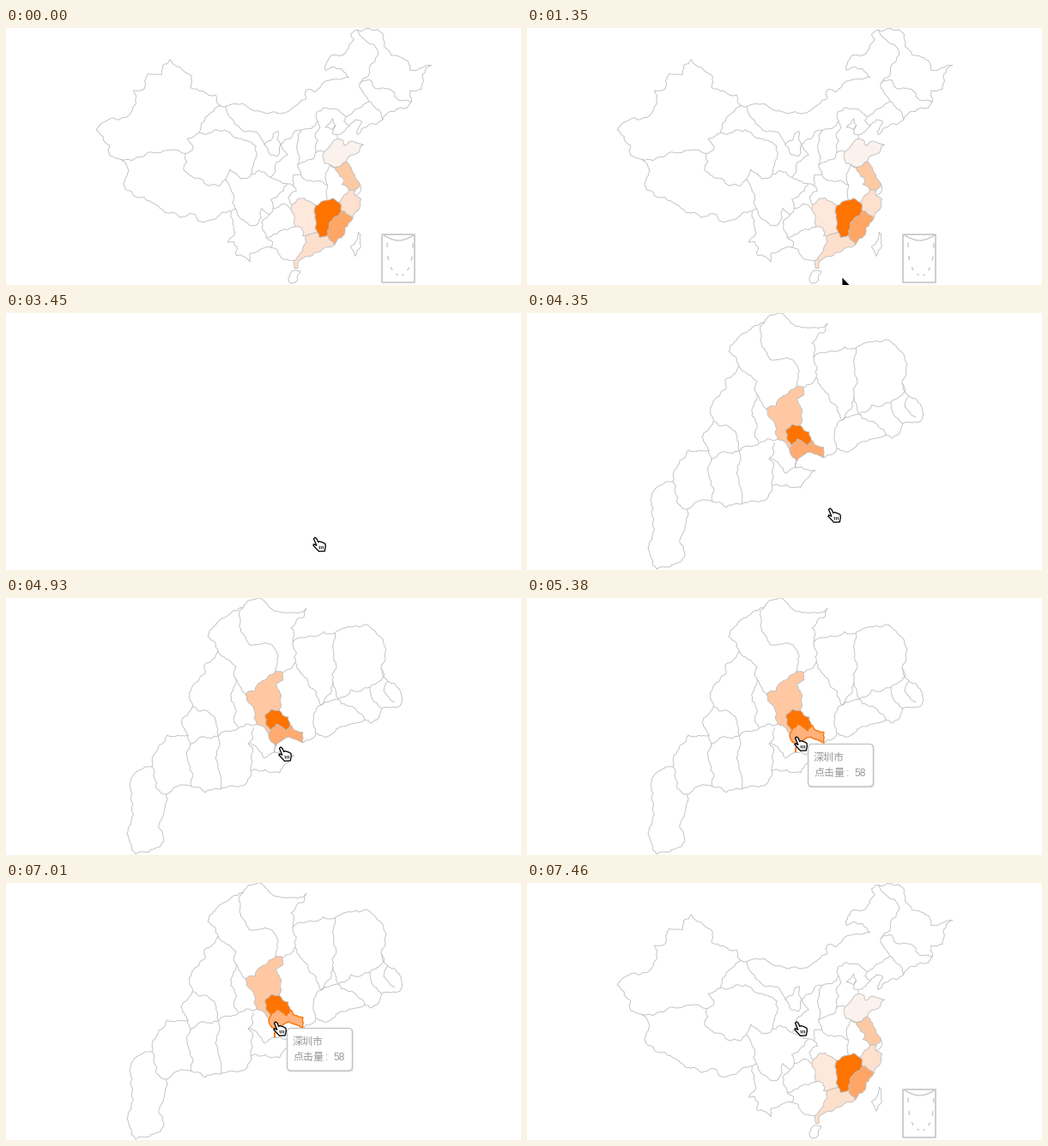
Animation of 600x300 px, one loop 8000 ms. Source, as a matplotlib script:

```python
import math
import random
import matplotlib.pyplot as plt
from matplotlib.animation import FuncAnimation
from matplotlib.collections import LineCollection
from matplotlib.patches import FancyBboxPatch, Polygon

W, H, PX = 600, 300, 0.72
LOOP, STEP = 8000, 25
GREY, ORANGE = "#c0c0c0", "#ff7300"

fig = plt.figure(figsize=(W / 100, H / 100), dpi=100, facecolor="white")
ax = fig.add_axes([0, 0, 1, 1])
ax.set_xlim(0, W)
ax.set_ylim(H, 0)
ax.axis("off")


def split(a, b, rng):
    dx, dy = b[0] - a[0], b[1] - a[1]
    if dx * dx + dy * dy < 16:
        return [a]
    k = rng.uniform(-0.18, 0.18)
    mid = ((a[0] + b[0]) / 2 - dy * k, (a[1] + b[1]) / 2 + dx * k)
    return split(a, mid, rng) + split(mid, b, rng)


def rough(points):
    """Wiggly border; a shared edge gets the same wiggle in both directions."""
    out = []
    for a, b in zip(points, points[1:]):
        lo, hi = sorted((a, b))
        edge = split(lo, hi, random.Random(f"{lo}{hi}")) + [hi]
        out += edge if a == lo else edge[::-1]
    return out


def project(points):
    return [(round(105 + (lon - 73.5) * 6.36, 1), round((53.55 - lat) * 8.44, 1))
            for lon, lat in points]


def chain(*parts):
    """Join border pieces into one ring."""
    ring = [p for part in parts for p in part]
    ring = [p for i, p in enumerate(ring) if i == 0 or p != ring[i - 1]]
    return ring if ring[0] == ring[-1] else ring + [ring[0]]


def add_lines(paths, width=0.9):
    return ax.add_collection(LineCollection(paths, colors=GREY, linewidths=width * PX, zorder=1))


def add_area(ring, fill, edge=GREY, width=0.9, z=2):
    return ax.add_patch(Polygon(rough(ring), facecolor=fill, edgecolor=edge,
                                linewidth=width * PX, joinstyle="round", zorder=z))


# ---- country: longitude, latitude ----
north = [(73.5, 39.4), (74.8, 40.5), (78.1, 41.1), (80.1, 42.1), (80.8, 43.2), (80.3, 44.9),
         (82.4, 45.2), (83, 47.2), (85.5, 47.1), (85.7, 48.4), (87.1, 49.2), (88.1, 48.3),
         (91, 46.8), (90.8, 45.3), (95.4, 44.3), (96.3, 42.8), (97.2, 42.7), (101.8, 42.3),
         (104.5, 41.7), (109.3, 42.4), (111.9, 43.7), (112, 45), (113.6, 44.7), (116.2, 46.3),
         (119.8, 46.7), (118.5, 47.9), (115.5, 47.7), (116.7, 49.8), (119.2, 50.1),
         (120.7, 52), (120.1, 52.7), (121.3, 53.3)]
east = [(121.3, 53.3), (123.6, 53.5), (126.1, 52.6), (127.5, 49.8), (130.7, 48.9),
        (131, 47.7), (134.9, 48.4), (133.1, 45.1), (131, 44.9), (131.3, 43.4), (130.5, 42.5),
        (128.1, 42), (126.9, 41.8), (126, 40.9), (121.3, 38.8), (122.2, 40.5), (121, 40.9),
        (119.9, 40), (117.7, 38.8), (117.7, 38.2)]
southwest = [(109.8, 21.4), (108, 21.5), (106.7, 22.9), (105.5, 23.2), (101.7, 22.4),
             (101.7, 21.2), (99.2, 22.1), (98.7, 24), (97.6, 23.9), (98.7, 25.9),
             (98.2, 28.2), (95.8, 27.5), (94, 26.9), (92.1, 26.9), (91.6, 27.8), (89, 27.3),
             (86.2, 28), (82.2, 30.2), (78.8, 31.3), (78, 35.4), (76, 35.9), (74.8, 38.5),
             (73.5, 39.4)]
west_inner = [
    [(78, 35.4), (82, 35.7), (89.8, 36.2), (91.3, 37), (90.2, 38.2), (92.4, 39.1),
     (92.8, 40.4), (96.3, 42.8)],
    [(89.8, 36.2), (89.5, 34), (92, 32.8), (96, 31.7), (97.2, 32.6), (98.7, 30.5),
     (99.1, 28.5), (98.2, 28.2)],
    [(97.2, 32.6), (98, 34), (100, 32.7), (101.9, 33.3)],
    [(92.4, 39.1), (98.3, 38.8), (102.8, 37.2), (102.4, 35), (101.9, 33.3)],
    [(97.2, 42.7), (97.8, 41.4), (100.2, 39.4), (103, 39.1), (104.3, 37.4)],
]
loess_inner = [
    [(104.3, 37.4), (106, 39), (106.8, 39.3), (107.3, 37.5), (106.7, 35.8), (105.4, 36),
     (104.3, 37.4)],
    [(107.3, 37.5), (108.6, 36), (106.6, 35), (105.5, 32.9), (103.2, 33.8), (101.9, 33.3)],
    [(107.3, 37.5), (109.9, 39.3), (111.1, 39.4), (110.4, 36.5), (110.4, 34.6), (111, 33.3),
     (109.6, 33.2), (109.6, 31.7), (108.5, 32), (105.5, 32.9)],
]
south_inner = [
    [(108.5, 32), (106.7, 30.2), (105.5, 29.8), (105.9, 28.6), (107.5, 29.2), (109.2, 28.5)],
    [(109.6, 31.7), (110.2, 31), (108.7, 30.2), (109.3, 29.1)],
    [(99.1, 28.5), (101.7, 26.2), (102.7, 26.2), (103.9, 28.6), (105.3, 27.8), (105.9, 28.6)],
    [(105.3, 27.8), (103.8, 26.7), (104.6, 24.6), (107.2, 25.5), (109.8, 26)],
    [(104.6, 24.6), (105.8, 24), (105.5, 23.2)],
]
plain_inner = [
    [(111, 33.3), (112.3, 32.4), (113.8, 32.4), (115.9, 31.8)],
    [(110.4, 34.6), (113, 35.4), (113.7, 36.3), (115.3, 36.4)],
    [(116.4, 34.6), (115.5, 33.1), (115.9, 31.8), (115.9, 29.8)],
    [(113.7, 36.3), (114.1, 38), (113.6, 38.8), (114.5, 39.8), (114.1, 40.7), (111.1, 39.4)],
    [(114.1, 40.7), (113.9, 41.9), (116.9, 42.4), (119.3, 41.3), (118.9, 40.7), (119.9, 40)],
    [(117.3, 40.1), (116.8, 41), (115.5, 39.8), (116.8, 39.5), (117.3, 40.1), (116.8, 38.9),
     (117.7, 38.8)],
]
northeast_inner = [
    [(119.3, 41.3), (121.4, 42.4), (123.5, 43.4), (125.5, 42), (126, 40.9)],
    [(123.5, 43.4), (121.8, 45.9), (123.9, 46.3), (124.2, 45.5), (126.5, 45.2), (128.8, 43.6),
     (131.3, 43.4)],
    [(121.8, 45.9), (123, 46.7), (123.6, 48.1), (125.2, 49.9), (124.3, 51.3), (121.3, 53.3)],
]
islands = [
    [(108.7, 19), (109.5, 20), (110.9, 19.9), (110.4, 18.7), (109.2, 18.2), (108.7, 19)],
    [(121.5, 25.3), (121.9, 25), (120.9, 22), (120.1, 23.3), (121.5, 25.3)],
    [(121.9, 31.8), (121.9, 30.9), (120.9, 30.4)],
]

# Borders shared by the coloured provinces
hn_jx = [(113.7, 29), (113.6, 27.3), (114, 25.3)]
hn_gd = [(114, 25.3), (112, 24.8)]
jx_gd = [(114, 25.3), (114.4, 24.6), (115.9, 24.9)]
jx_fj = [(115.9, 24.9), (116.2, 26), (118.4, 28.2)]
jx_zj = [(118.4, 28.2), (118, 29.4)]
fj_gd = [(115.9, 24.9), (117.2, 23.6)]
fj_zj = [(118.4, 28.2), (119, 28.2), (120.5, 27.2)]
js_zj = [(119.8, 31.1), (120.9, 31)]
js_sd = [(116.4, 34.6), (118.4, 34.5), (119.3, 35.1)]

shandong = chain([(117.7, 38.2), (118.8, 37.9), (119, 37.3), (120.8, 37.8), (122.5, 37.4),
                  (120.2, 36)], js_sd[::-1], [(115.4, 34.8), (115.3, 36.4)])
jiangsu = chain(js_sd, [(120.3, 34.2), (120.9, 32.9), (121.9, 31.8)], js_zj[::-1],
                [(118.5, 31.9), (118.9, 32.6), (117.6, 33.7)])
zhejiang = chain(js_zj, [(120.9, 30.4), (122, 29.9), (121.6, 28.4)], fj_zj[::-1], jx_zj,
                 [(119.4, 30.6)])
fujian = chain(fj_zj, [(119.8, 26.6), (118.9, 24.9)], fj_gd[::-1], jx_fj)
jiangxi = chain(hn_jx, jx_gd, jx_fj, jx_zj, [(116.8, 30), (115, 29.6)])
hunan = chain(hn_jx, hn_gd, [(111.3, 24.8), (111.2, 25.9), (109.8, 26), (109.2, 28.5),
                             (109.3, 29.1), (110.6, 30), (112.5, 29.6)])
guangdong = chain(hn_gd[::-1], jx_gd, fj_gd,
                  [(114.7, 22.7), (113.4, 22.4), (110.5, 21.3), (110.4, 20.3), (109.9, 20.3),
                   (109.8, 21.4), (110.9, 22.4), (111.9, 23.8)])

country_paths = [north, east, southwest, *west_inner, *loess_inner, *south_inner,
                 *plain_inner, *northeast_inner, *islands]
country = [add_lines([rough(project(p)) for p in country_paths])]
for ring, fill in [(shandong, "#fcf2ed"), (jiangsu, "#fcc9a3"), (zhejiang, "#fde0cd"),
                   (hunan, "#fde8db"), (guangdong, "#fde0cc"), (fujian, "#ffa565"),
                   (jiangxi, ORANGE)]:
    country.append(add_area(project(ring), fill))

# Inset of the southern islands: a shore line and a U of dashes
country.append(add_lines([[(438, 241), (476, 241), (476, 297), (438, 297), (438, 241)]], 1.5))
shore = [(440 + x, 242 + 6 * math.sin(math.pi * x / 35)) for x in range(36)]


def bay(angle):
    return 459 + 15 * math.cos(angle), 256 + 33 * math.sin(angle)


dashes = [[bay(k * 0.47 - 0.15), bay(k * 0.47 + 0.02)] for k in range(8)]
country.append(add_lines([shore, *dashes], 1.2))

# ---- province: pixels ----
outline_east = [(277, 10), (293, 0), (305, 8), (350, 12), (347, 22), (332, 35), (334, 52),
                (358, 45), (383, 41), (405, 33), (428, 37), (437, 46), (442, 70), (437, 82),
                (445, 97), (459, 108), (459, 126), (438, 129), (425, 146), (418, 142),
                (393, 150), (361, 158), (346, 169)]
outline_west = [(313, 180), (336, 184), (319, 204), (285, 201), (281, 215), (250, 223),
                (216, 220), (187, 229), (184, 250), (178, 265), (184, 284), (180, 290),
                (151, 299), (141, 275), (145, 212), (170, 197), (178, 172), (188, 160),
                (212, 160), (204, 145), (217, 127), (216, 106), (232, 88), (231, 78),
                (247, 62), (235, 45), (247, 28), (262, 17), (277, 10)]
inner_east = [
    [(277, 10), (273, 28), (286, 55), (308, 54), (315, 62), (313, 87)],
    [(334, 52), (337, 75), (322, 87)],
    [(337, 75), (352, 97), (367, 125), (358, 147), (361, 158)],
    [(383, 41), (382, 65), (385, 80), (381, 98), (378, 112), (367, 125), (387, 118),
     (408, 130), (418, 142)],
    [(381, 98), (387, 118), (402, 107), (424, 104), (440, 92), (437, 82)],
    [(424, 104), (426, 116), (438, 129)],
    [(445, 97), (440, 109), (453, 122)],
]
inner_west = [
    [(247, 62), (268, 80), (268, 95), (279, 112)],
    [(268, 95), (262, 120), (268, 130), (270, 151)],
    [(217, 127), (245, 144), (247, 161)],
    [(212, 160), (215, 171), (247, 161), (280, 147), (292, 147)],
    [(215, 171), (212, 190), (216, 220)],
    [(247, 161), (247, 195), (250, 223)],
    [(288, 151), (282, 170), (287, 190), (285, 201)],
    [(170, 197), (175, 222), (187, 229)],
    [(282, 170), (301, 187), (313, 180)],
]
gz_dg = [(318, 131), (309, 130), (302, 136), (303, 148), (309, 154)]
dg_sz = [(309, 154), (315, 147), (327, 155), (331, 148)]
gz_sz = [(309, 154), (306, 161)]
guangzhou = chain([(279, 112), (297, 98), (313, 87), (322, 87), (323, 95), (314, 100),
                   (320, 117)], gz_dg, gz_sz, [(292, 147), (286, 125)])
dongguan = chain(gz_dg, dg_sz, [(329, 139)])
shenzhen = chain(dg_sz, [(346, 157), (346, 169), (330, 162), (316, 170), (313, 180)],
                 gz_sz[::-1])
zhuhai = chain([(282, 170), (301, 187), (313, 180), (336, 184), (319, 204), (285, 201),
                (287, 190)])

province = [add_lines([rough(p) for p in [outline_east, outline_west, *inner_east, *inner_west]])]
for ring, fill in [(guangzhou, "#ffc8a3"), (shenzhen, "#ffaa70"), (dongguan, ORANGE)]:
    province.append(add_area(ring, fill))

scenes = {"country": country, "province": province, "empty": []}
hovers = {
    "广东": add_area(project(guangdong), "#fde4d3", ORANGE, 1.5, 3),
    "珠海市": add_area(zhuhai, "white", ORANGE, 1.3, 3),
    "深圳市": add_area(shenzhen, "#ffb27c", ORANGE, 1.3, 3),
    "东莞市": add_area(dongguan, ORANGE, ORANGE, 1.3, 3),
}
counts = {"广东": "111", "珠海市": "-", "深圳市": "58", "东莞市": "101"}

# ---- tooltip ----


def round_box(z, **style):
    return ax.add_patch(FancyBboxPatch((0, 0), 10, 10, zorder=z,
                                       boxstyle="round,pad=0,rounding_size=4.5", **style))


def label(font, text=""):
    return ax.text(0, 0, text, color="#999999", fontsize=12 * PX, family=font, zorder=7)


shadows = [round_box(5, fc="black", ec="none", alpha=0.07) for _ in range(3)]
panel = round_box(6, fc="white", ec="#bdbdbd", lw=1.1 * PX)
title, caption = label("Noto Sans CJK JP"), label("Noto Sans CJK JP", "点击量")
colon, number = label("Liberation Sans", ":"), label("Liberation Sans")
tip_parts = [*shadows, panel, title, caption, colon, number]


def place_tip(name, x, y):
    width = 62.5 + 6.7 * len(counts[name])
    for k, shadow in enumerate(shadows):
        shadow.set_bounds(x + 0.5, y + 1, width + k * 0.8, 49 + k)
    panel.set_bounds(x + 0.5, y + 0.5, width, 49.5)
    title.set_text(name)
    number.set_text(counts[name])
    title.set_position((x + 7, y + 20))
    for part, dx in [(caption, 7), (colon, 45), (number, 55)]:
        part.set_position((x + dx, y + 38))


# ---- cursors ----
arrow_shape = [(1, 0.5), (1, 16), (4.5, 12.8), (7, 18.5), (9.5, 17.5), (7.2, 12), (12, 12)]
hand_shape = [(1.5, 2.5), (3, 1), (5, 2.5), (6.8, 6.5), (8.2, 5.6), (12.4, 7), (15, 8.5),
              (15.3, 11.5), (14.3, 17), (7.5, 17.3), (0.9, 10.2), (1.5, 8.8), (4.8, 10.3)]
creases_shape = [[(8 + 2.1 * k, 11), (8.5 + 2 * k, 14.5)] for k in range(3)]


def cursor_patch(points, fill, edge, width):
    return ax.add_patch(Polygon(points, fc=fill, ec=edge, lw=width * PX,
                                joinstyle="round", zorder=9))


arrow = cursor_patch(arrow_shape, "black", "white", 0.8)
hand = cursor_patch(hand_shape, "white", "black", 1.3)
creases = ax.add_collection(LineCollection(creases_shape, colors="black",
                                           linewidths=0.9 * PX, zorder=10))


def shifted(points, x, y):
    return [(px + x, py + y) for px, py in points]


# start ms, scene, cursor place, hovered area, tooltip place
timeline = [
    (0, "country", None, None, None),
    (1350, "country", (366, 290), None, None),
    (1500, "country", (360, 266), None, None),
    (1650, "country", (357, 256), None, None),
    (1800, "country", (356, 254), None, None),
    (2850, "country", (357, 261), "广东", (372, 247)),
    (3450, "empty", (357, 261), None, None),
    (3600, "province", (357, 261), None, None),
    (4350, "province", (350, 227), None, None),
    (4490, "province", (341, 209), None, None),
    (4640, "province", (334, 195), None, None),
    (4780, "province", (318, 174), "珠海市", (326, 174)),
    (4930, "province", (317, 173), None, None),
    (5080, "province", (316, 165), None, None),
    (5230, "province", (316, 165), "深圳市", (325, 168)),
    (5380, "province", (311, 161), "深圳市", (327, 170)),
    (6120, "province", (311, 156), "深圳市", (327, 170)),
    (6270, "province", (309, 145), "深圳市", (325, 159)),
    (6420, "province", (308, 142), "东莞市", (324, 151)),
    (6720, "province", (308, 147), "东莞市", (324, 151)),
    (6870, "province", (311, 158), "深圳市", (325, 164)),
    (7010, "province", (311, 161), "深圳市", (327, 169)),
    (7460, "country", (311, 161), None, None),
]
HAND_FROM = 2850


def update(i):
    now = i * STEP + 20
    _, scene, spot, hovered, tip = [s for s in timeline if s[0] <= now][-1]
    for name, artists in scenes.items():
        for artist in artists:
            artist.set_visible(name == scene)
    for name, area in hovers.items():
        area.set_visible(name == hovered)
    for part in tip_parts:
        part.set_visible(tip is not None)
    if tip:
        place_tip(hovered, *tip)
    pointing = now >= HAND_FROM
    arrow.set_visible(spot is not None and not pointing)
    hand.set_visible(pointing)
    creases.set_visible(pointing)
    if spot:
        arrow.set_xy(shifted(arrow_shape, *spot))
        hand.set_xy(shifted(hand_shape, *spot))
        creases.set_segments([shifted(line, *spot) for line in creases_shape])
    return []


anim = FuncAnimation(fig, update, frames=LOOP // STEP, interval=STEP,
                     init_func=lambda: update(0), repeat=True, repeat_delay=0)
plt.show()
```
